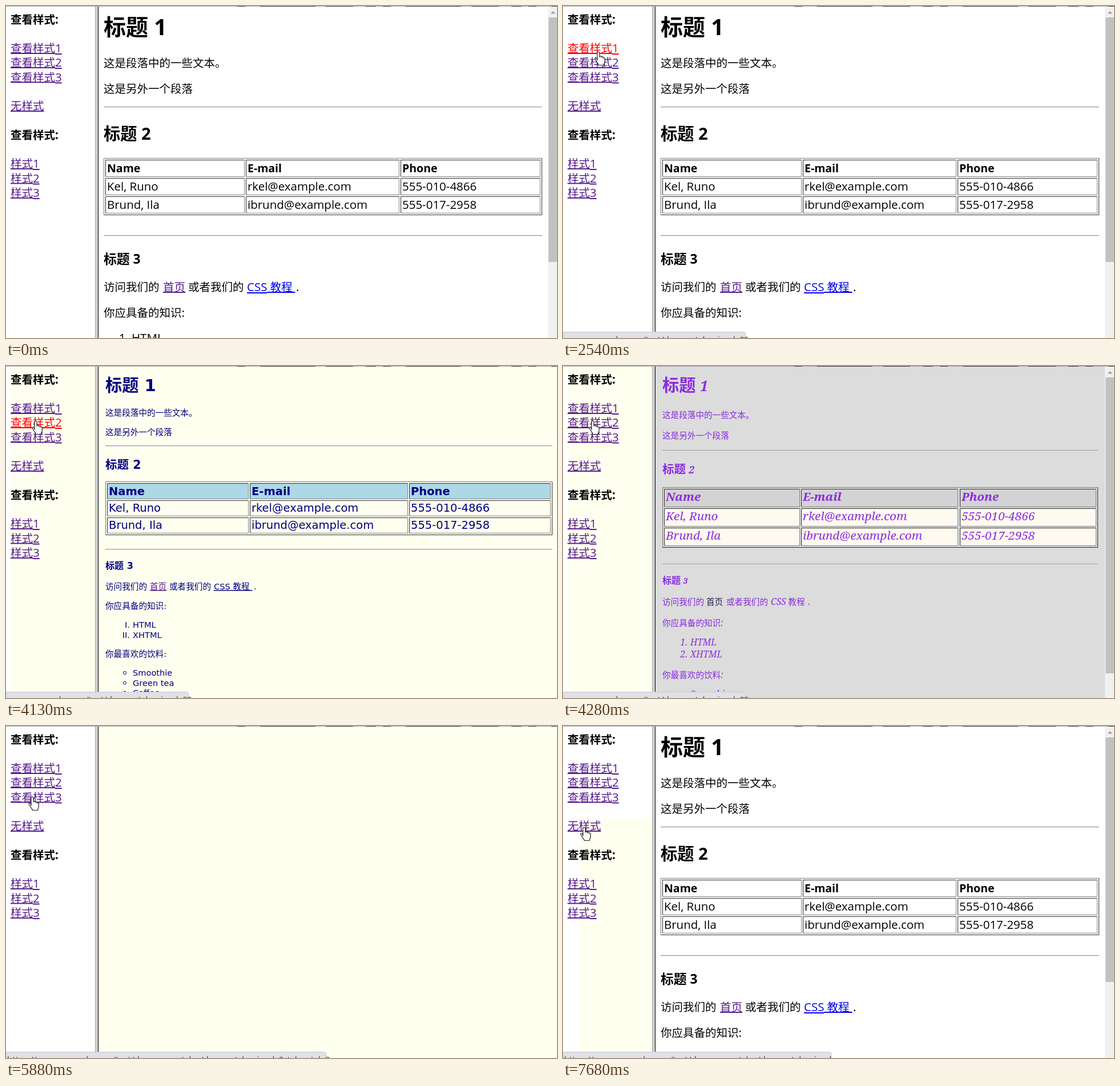
An HTML page for the animation above (8 s loop, 965 px wide and 581 px high).

```html
<!DOCTYPE html>
<html lang="zh">
<head>
<meta charset="utf-8">
<title>样式切换</title>
<style>
  html, body { margin: 0; width: 100%; height: 100%; overflow: hidden; background: #fff; }
  svg { display: block; width: 100vw; height: 100vh; }
  text { white-space: pre; text-decoration-skip-ink: none; }
</style>
</head>
<body>
<svg id="stage" viewBox="0 0 965 581"></svg>
<script>
const LOOP = 8000;
const CJK = "'Noto Sans CJK SC', 'Noto Sans CJK', sans-serif";
const IVORY = '#fffff0', VISITED = '#551a8b';
const people = [
  ['Name', 'E-mail', 'Phone'],
  ['Kel, Runo', 'rkel@example.com', '555-010-4866'],
  ['Brund, Ila', 'ibrund@example.com', '555-017-2958']
];

// latin, thLatin and headLatin scale the Latin runs of body text, table heads and headings.
const plain = {
  font: "'Open Sans', " + CJK, latin: 1.05, thLatin: 1, headLatin: 1, bg: '#fff', ink: '#000',
  x: 171, right: 939, sizes: [39, 29.2, 22.8, 19.5],
  h1: 51, p1: 107, p2: 152, rule1: 176, h2: 234, rule2: 401, h3: 451, visit: 499, know: 544,
  table: { top: 266, bottom: 366, splits: [419, 690], base: 21.6 },
  pieces: [0, 104, 148, 251, 337], linkInks: [VISITED, '#0000ee'], underline: true,
  marks: ['1.', '2.'], listX: 220, items: [588, 613], thumb: 448
};
const navy = {
  font: "'DejaVu Sans', " + CJK, latin: 1, thLatin: 1, headLatin: 1, bg: IVORY, ink: '#000080',
  x: 174, right: 957, sizes: [29.2, 20.5, 16.1, 14.6],
  h1: 44, p1: 87, p2: 121, rule1: 139, h2: 180, rule2: 320, h3: 355, visit: 391, know: 425,
  table: { top: 202, bottom: 296, splits: [426, 705], base: 20.2, head: '#add8e6' },
  pieces: [0, 78, 112, 190, 260], linkInks: [VISITED, '#000080'], underline: true,
  marks: ['I.', 'II.'], listX: 222, items: [458, 476], drinks: [509, 542, 559.5, 577]
};
const script = {
  font: "'Noto Serif', " + CJK, latin: 1.06, thLatin: 1.06, headLatin: .85, italic: true,
  bg: '#dcdcdc', ink: '#8a2be2',
  x: 174, right: 937, sizes: [29.2, 20.5, 16.1, 14.6],
  h1: 44, p1: 91, p2: 127, rule1: 147, h2: 188, rule2: 346, h3: 381, visit: 418, know: 455,
  table: { top: 212, bottom: 318, splits: [416, 693.5], base: 20.8, head: '#d3d3d3', cell: '#fffaf0' },
  pieces: [0, 77, 112, 190, 255], linkInks: ['#2c1a4d', '#8a2be2'],
  marks: ['1.', '2.'], listX: 223, items: [489, 510], drinks: [546, 580], thumb: 538
};
// The third style is the navy one with a wide margin.
const padded = {
  ...navy, right: 791, dx: 73, dy: 73, thumb: 471, drinks: [],
  table: { ...navy.table, splits: [356.5, 608] }
};

const rect = (x, y, right, bottom, fill) =>
  `<rect x="${x}" y="${y}" width="${right - x}" height="${bottom - y}" fill="${fill}"/>`;

function label(theme, x, y, string, size, { bold, scale = theme.latin, ink = theme.ink, underline, anchor = 'start' } = {}) {
  const runs = string.replace(/[!-~]+( [!-~]+)*/g, run =>
    `<tspan font-size="${size * scale}" font-style="${theme.italic ? 'italic' : 'normal'}">${run}</tspan>`);
  return `<text x="${x}" y="${y}" font-family="${theme.font}" font-size="${size}" fill="${ink}" ` +
    `font-weight="${bold ? 700 : 400}" text-anchor="${anchor}" ` +
    `text-decoration="${underline ? 'underline' : 'none'}">${runs}</text>`;
}

function bevel(x, y, right, bottom, topLeft, bottomRight) {
  const line = (d, color) => `<path d="${d}" fill="none" stroke="${color}"/>`;
  const [l, t, r, b] = [x + .5, y + .5, right - .5, bottom - .5];
  return line(`M${l} ${b}V${t}H${r}`, topLeft) + line(`M${l} ${b}H${r}V${t}`, bottomRight);
}

function table({ x, right, ...theme }) {
  const { top, bottom, splits, base, head, cell } = theme.table;
  const gap = 2.44, inset = 1 + gap;
  const height = (bottom - top - 2 * inset - 2 * gap) / 3;
  const lefts = [x + inset, ...splits.map(s => s + gap / 2)];
  const rights = [...splits.map(s => s - gap / 2), right - inset];
  let out = bevel(x, top, right, bottom, '#777', '#2c2c2c');
  people.forEach((person, r) => person.forEach((value, c) => {
    const y = top + inset + r * (height + gap);
    const box = [lefts[c], y, rights[c], y + height].map(Math.round);
    out += rect(...box, (r ? cell : head) || 'none') + bevel(...box, '#2c2c2c', '#808080') +
      label(theme, box[0] + 3, y + base, value, 19.5, r ? {} : { bold: true, scale: theme.thLatin });
  }));
  return out;
}

function scrollbar(thumb) {
  return rect(949, 1, 965, 581, '#f1f1f1') + rect(950.3, 20, 965, thumb, '#c1c1c1') +
    '<path d="M953.5 13.5l4.5-4.5 4.5 4.5z" fill="#a3a3a3"/>';
}

function pageContent(theme) {
  const { x, right, sizes, pieces, underline, linkInks, listX, items, drinks = [] } = theme;
  const body = sizes[3];
  const heading = (y, string, level) =>
    label(theme, x, y, string, sizes[level], { bold: true, scale: theme.headLatin });
  const paragraph = (y, string) => label(theme, x, y, string, body);
  const rule = y => rect(x, y, right, y + 1, '#999') + rect(x, y + 1, right, y + 2, '#e6e6e6');
  const visit = pieces.map((offset, i) =>
    label(theme, x + offset, theme.visit, ['访问我们的', '首页', '或者我们的', 'CSS 教程 ', '.'][i], body,
      i % 2 ? { ink: linkInks[i >> 1], underline } : {}));
  const list = items.map((y, i) =>
    label(theme, listX - 5, y, theme.marks[i], body, { anchor: 'end' }) +
    label(theme, listX, y, ['HTML', 'XHTML'][i], body));
  const drinkList = drinks.slice(1).map((y, i) =>
    `<circle cx="208" cy="${y - 5}" r="2.6" fill="none" stroke="${theme.ink}"/>` +
    label(theme, listX, y, ['Smoothie', 'Green tea', 'Coffee'][i], body));
  return heading(theme.h1, '标题 1', 0) + paragraph(theme.p1, '这是段落中的一些文本。') +
    paragraph(theme.p2, '这是另外一个段落') + rule(theme.rule1) + heading(theme.h2, '标题 2', 1) +
    table(theme) + rule(theme.rule2) + heading(theme.h3, '标题 3', 2) + visit.join('') +
    paragraph(theme.know, '你应具备的知识:') + list.join('') +
    (drinks.length ? paragraph(drinks[0], '你最喜欢的饮料:') : '') + drinkList.join('');
}

function page({ theme, blank, bottom = 573, thumb = theme.thumb }) {
  return rect(162, 1, 965, 581, theme.bg) +
    (blank ? '' : `<g clip-path="url(#to${bottom})"><g transform="translate(${theme.dx || 0} ${theme.dy || 0})">` +
      pageContent(theme) + '</g></g>') +
    (thumb ? scrollbar(thumb) : '');
}

const sidebarLinks = [['查看样式1', 81], ['查看样式2', 106], ['查看样式3', 131.5], ['无样式', 182],
  ['样式1', 283], ['样式2', 308.5], ['样式3', 334]];

function sidebar(tint, active) {
  return rect(0, 1, 156, 581, '#fff') + (tint ? rect(...tint, IVORY) : '') +
    [31, 233].map(y => label(plain, 8, y, '查看样式:', 19.5, { bold: true })).join('') +
    sidebarLinks.map(([name, y], i) =>
      label(plain, 8, y, name, 19.5, { ink: i === active ? '#f00' : VISITED, underline: true })).join('') +
    rect(156, 1, 157, 581, '#aaa') + rect(157, 1, 161, 581, '#d0d0d0') + rect(161, 1, 162, 581, '#000');
}

function statusBar({ width, x, url }) {
  return `<path d="M0 581V570.5H${width - 4}q4 0 4 4V581" fill="#dee1e6" stroke="#c9ccd1"/>` +
    `<text x="${x}" y="588.5" font-family="'Noto Sans', sans-serif" font-size="15" fill="#444">${url}</text>`;
}

function cursor([x, y, hand]) {
  const shape = hand
    ? 'M-2 15V2a2 2 0 0 1 4 0v7a1.8 1.8 0 0 1 3.5 0v1a1.8 1.8 0 0 1 3.3 0v1a1.5 1.5 0 0 1 2.5 .5v5c0 3-2 4-2 7h-9c0-2-2.5-4-3.5-6.5l-2.6-4c-.8-1.8 1.6-3 2.8-1.4z'
    : 'M0 0V17l4-4 3 7 3-1-3-7h6z';
  return `<path transform="translate(${x} ${y})" d="${shape}" fill="#fff" stroke="#222" stroke-width="1.2" stroke-linejoin="round"/>`;
}

// Each track holds [start time, value]; the value lasts until the next entry.
const at = (track, time) => track.filter(([start]) => start <= time).pop()[1];

const pages = [
  [0, { theme: plain, bottom: 581 }], [2820, { theme: navy }], [4280, { theme: script }],
  [5880, { theme: padded, blank: true, thumb: 0 }], [6030, { theme: padded }],
  [7530, { theme: plain, blank: true }], [7680, { theme: plain }]
];
const tints = [[0, null], [2820, [8, 1, 156, 570]], [5730, [8, 1, 156, 97]], [5880, null], [6620, [30, 162, 156, 570]]];
const pressed = [[0, -1], [2540, 0], [2820, -1], [3970, 1], [4280, -1], [5730, 2], [5880, -1], [7410, 3], [7530, -1]];
const address = 'https://www.example.com/test/demo_css_styles/demo_style';
const bars = [
  [0, null],
  [2050, { width: 320, x: 6, url: 'www.example.com/test/demo_style_simple?2' }],
  [5400, { width: 561, x: 2, url: address + '_simple?style=style3' }],
  [6750, { width: 470, x: 2, url: address + '_simple' }]
];
// [first step, last step, steps, from x, from y, to x, to y, hand]
const moves = [
  [850, 1360, 4, 525, 548, 121, 229, false],
  [1640, 1775, 2, 95, 165, 70, 125, true],
  [1910, 2540, 5, 52, 96, 62, 80, true],
  [3250, 3970, 7, 62, 80, 52, 96, true],
  [4960, 5730, 6, 52, 97, 46, 124, true],
  [6470, 7030, 5, 46, 125, 37, 177, true]
];

function pointer(time) {
  const move = moves.filter(([start]) => start <= time).pop();
  if (!move) return null;
  const [start, end, steps, x0, y0, x1, y1, hand] = move;
  const progress = Math.min(1, Math.floor((time - start) / (end - start) * (steps - 1) + 1e-6) / (steps - 1));
  return [x0 + (x1 - x0) * progress, y0 + (y1 - y0) * progress, hand];
}

const clip = bottom => `<clipPath id="to${bottom}"><rect x="162" y="1" width="803" height="${bottom - 1}"/></clipPath>`;
const topEdge = rect(0, 0, 965, 1, '#aaa') +
  '<path d="M405 .5H965" stroke="#333" stroke-dasharray="14 26 97 18 48 22 18 12" fill="none"/>';
const stage = document.getElementById('stage');
let shown = '';

function draw() {
  const time = performance.now() % LOOP;
  const bar = at(bars, time), mouse = pointer(time);
  const picture = clip(573) + clip(581) + page(at(pages, time)) +
    sidebar(at(tints, time), at(pressed, time)) + topEdge +
    (bar ? statusBar(bar) : '') + (mouse ? cursor(mouse) : '');
  if (picture !== shown) stage.innerHTML = shown = picture;
  requestAnimationFrame(draw);
}
draw();
</script>
</body>
</html>
```
